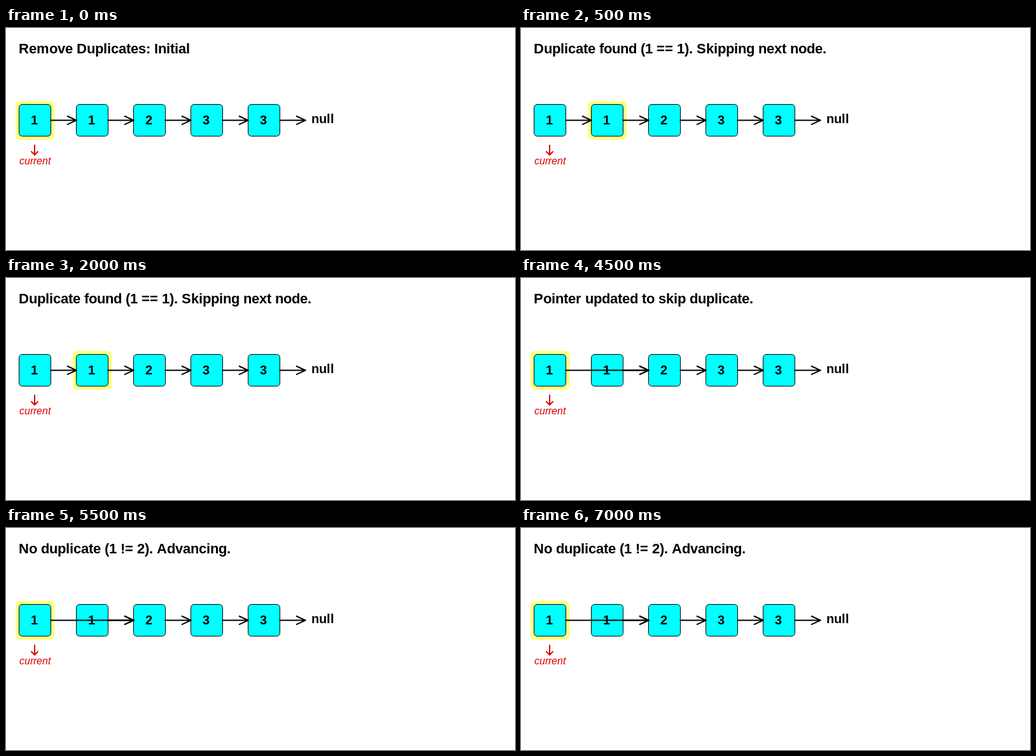
Write an HTML page with a canvas that moves like this. It is 800 by 350 pixels and loops after 8000 ms.

```html
<!DOCTYPE html>
<html>
<head>
<meta charset="utf-8">
<title>Remove Duplicates</title>
<style>
  html, body { margin: 0; overflow: hidden; background: #fff; }
  canvas { display: block; }
</style>
</head>
<body>
<canvas id="stage" width="800" height="350"></canvas>
<script>
const ctx = document.getElementById('stage').getContext('2d');
const LOOP = 8000, SIZE = 50, GAP = 90, LEFT = 20, TOP = 120, MID = 145.5;
const BARB = 15, SPREAD = 25 * Math.PI / 180;
const VALUES = [1, 1, 2, 3, 3];
const STEPS = [
  { at: 0, title: 'Remove Duplicates: Initial', lit: 0, skip: false },
  { at: 500, title: 'Duplicate found (1 == 1). Skipping next node.', lit: 1, skip: false },
  { at: 3000, title: 'Pointer updated to skip duplicate.', lit: 0, skip: true },
  { at: 5500, title: 'No duplicate (1 != 2). Advancing.', lit: 0, skip: true }
];

const nodeX = i => LEFT + i * GAP;

// Whole-pixel glyph advances, as in classic hinted text
function text(str, x, y, style, color = '#000') {
  ctx.font = `${style} "Liberation Sans", Arial, sans-serif`;
  ctx.fillStyle = color;
  for (const ch of str) {
    ctx.fillText(ch, x, y);
    x += Math.round(ctx.measureText(ch).width);
  }
}

function roundRect(x, y, size, radius) {
  ctx.beginPath();
  ctx.roundRect(x, y, size, size, radius);
}

function arrow(x1, y1, x2, y2, barb, spread, color = '#000') {
  const angle = Math.atan2(y2 - y1, x2 - x1);
  ctx.strokeStyle = color;
  ctx.lineWidth = 2;
  ctx.lineCap = 'square';
  ctx.beginPath();
  ctx.moveTo(x1, y1);
  ctx.lineTo(x2, y2);
  for (const side of [-spread, spread]) {
    ctx.moveTo(x2, y2);
    ctx.lineTo(x2 - barb * Math.cos(angle + side), y2 - barb * Math.sin(angle + side));
  }
  ctx.stroke();
}

function node(value, x, lit) {
  if (lit) {
    roundRect(x - 5, TOP - 5, SIZE + 11, 7);
    ctx.fillStyle = '#ffff80';
    ctx.fill();
  }
  roundRect(x + 0.5, TOP + 0.5, SIZE, 5);
  ctx.fillStyle = '#0ff';
  ctx.fill();
  ctx.strokeStyle = '#000';
  ctx.lineWidth = 1;
  ctx.stroke();
  text(String(value), x + 19, 152, 'bold 20px');
}

function draw(time) {
  const step = STEPS.findLast(s => s.at <= time % LOOP);
  ctx.fillStyle = '#fff';
  ctx.fillRect(0, 0, 800, 350);
  text(step.title, 20, 40, 'bold 22px');
  VALUES.forEach((value, i) => node(value, nodeX(i), i === step.lit));
  VALUES.forEach((_, i) => {
    const target = i === 0 && step.skip ? 2 : i + 1;
    arrow(nodeX(i) + SIZE + 0.5, MID, nodeX(target) + 0.5, MID, BARB, SPREAD);
  });
  text('null', nodeX(VALUES.length) + 10, 150, 'bold 20px');
  arrow(45, 185, 45, 200, 7, Math.PI / 4, '#dc0000');
  text('current', 21, 215, 'italic 16px', '#dc0000');
}

function tick() {
  draw(performance.now());
  requestAnimationFrame(tick);
}
tick();
</script>
</body>
</html>
```
